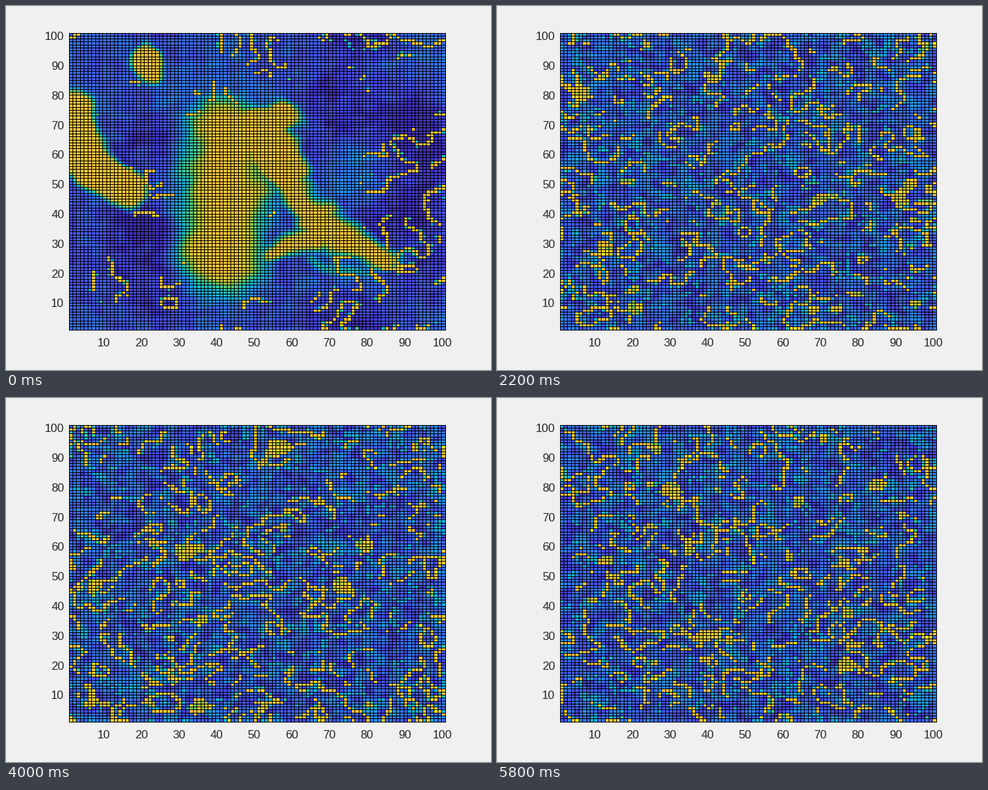
Write a matplotlib script that moves like this. It is 700x525 px and loops after 6000 ms.

```python
import numpy as np
import matplotlib.pyplot as plt
from matplotlib.animation import FuncAnimation

W, H, DPI = 700, 525, 100
N, FRAMES, STEP = 100, 30, 200
LEFT, TOP, PW, PH = 91, 39, 544, 429

PARULA = np.array([
    (.2422, .1504, .6603), (.2810, .3228, .9579), (.1786, .5289, .9682),
    (.0689, .6948, .8394), (.2161, .7843, .5923), (.6720, .7793, .2227),
    (.9970, .7659, .2199), (.9769, .9839, .0805)])

# Hot strokes of the opening state: x0, y0, x1, y1, radius, fade width
STROKES = [
    (43, 68, 41, 24, 4, 13), (50, 69, 56, 73, 4, 4), (53, 66, 57, 54, 4, 4),
    (57, 50, 66, 40, 2, 5), (66, 36, 82, 25, 2, 6), (55, 27, 66, 30, 1, 5),
    (66, 24, 80, 17, -3, 6), (3, 75, 4, 58, 4, 4), (5, 56, 17, 46, 3, 4),
    (22, 88, 22, 93, 2, 3)]


def noise(rng, s):
    """Periodic smooth noise with unit deviation."""
    f = np.fft.fftfreq(N)
    k = np.exp(-2 * (np.pi * s) ** 2 * (f[:, None] ** 2 + f ** 2))
    a = np.fft.ifft2(np.fft.fft2(rng.standard_normal((N, N))) * k).real
    return (a - a.mean()) / a.std()


def filaments(rng, s):
    """Distance in cells to the zero contours of a noise field."""
    n = noise(rng, s)
    gy, gx = np.gradient(n)
    return np.abs(n) / (np.hypot(gx, gy) + .02)


def hot(rng):
    v = .85 + .03 * rng.standard_normal((N, N))
    return np.where(rng.random((N, N)) < .08, .96, v)


def stroke(x, y, x0, y0, x1, y1, r, fade):
    """Smooth 0..1 level around a segment."""
    dx, dy = x1 - x0, y1 - y0
    t = np.clip(((x - x0) * dx + (y - y0) * dy) / (dx * dx + dy * dy), 0, 1)
    d = np.hypot(x - x0 - t * dx, y - y0 - t * dy)
    u = np.clip(1 - (d - r) / fade, 0, 1)
    return u * u * (3 - 2 * u)


def weave(rng, v, d, live, fringe):
    """Lay hot lines with a ragged green fringe over v."""
    r = rng.random((N, N))
    v = np.where(live & (d < 1.2) & (r < fringe), .36 + .9 * r, v)
    return np.where(live & (d < .55), hot(rng), v)


def opening(rng):
    y, x = np.mgrid[1:N + 1, 1:N + 1].astype(float)
    wx, wy = x + noise(rng, 2.5), y + noise(rng, 2.5)
    heat = np.max([stroke(wx, wy, *s) for s in STROKES], axis=0)
    pool = np.exp(-((x - 72) / 11) ** 2 - ((y - 60) / 17) ** 2)
    base = .15 + .06 * noise(rng, 7) + .03 * noise(rng, 1) - .1 * pool
    base = np.clip(base, .03, .33)
    v = base + (.86 - base) * heat
    ragged = noise(rng, 4) + (x - 50) / 60 - pool > .55
    return weave(rng, v, filaments(rng, 1.9), ragged & (heat < .6), .25)


def turbulence(rng, s):
    v = np.clip(.2 + .07 * noise(rng, .7), .08, .36)
    r = rng.random((N, N))
    v = np.where((noise(rng, 1) > 1) & (r < .6), .36 + .16 * r, v)
    v = weave(rng, v, filaments(rng, s), noise(rng, 1.8) > -.25, .25)
    blob = noise(rng, 1.8) > 2
    return np.where(blob, np.where(r < .7, hot(rng), .35 + .4 * r), v)


def cells(i):
    rng = np.random.default_rng(40 + i)
    return turbulence(rng, 1.5 + 2 * np.exp(-i)) if i else opening(rng)


def grid(size):
    """Line pixels and the cell under each pixel along one axis."""
    lines = np.floor(np.linspace(0, size - 1, N + 1)).astype(int)
    under = np.searchsorted(lines, np.arange(size), 'right') - 1
    return lines, np.minimum(under, N - 1)


ex, ix = grid(PW)
ey, iy = grid(PH)
stops = np.linspace(0, 1, len(PARULA))


def picture(i):
    v = cells(i)[::-1]
    rgb = np.stack([np.interp(v, stops, c) for c in PARULA.T], axis=-1)
    img = np.rint(rgb * 255).astype(np.uint8)[iy][:, ix]
    img[ey] = 0
    img[:, ex] = 0
    return img


fig = plt.figure(figsize=(W / DPI, H / DPI), dpi=DPI, facecolor='#f0f0f0')
mesh = fig.figimage(picture(0), xo=LEFT, yo=H - TOP - PH, origin='upper')


def label(x, y, s, ha):
    fig.text(x / W, 1 - y / H, s, ha=ha, va='baseline', fontsize=12.2,
             family='Liberation Sans', color='#262626')


for n in range(10, N + 1, 10):
    label(LEFT + 1 + (n - 1) * (PW - 1) / N, 491, str(n), 'center')
    label(84, TOP + PH + 5 - (n - 1) * (PH - 1) / N, str(n), 'right')


def update(i):
    mesh.set_data(picture(i))
    return [mesh]


anim = FuncAnimation(fig, update, frames=FRAMES, interval=STEP,
                     repeat=True, repeat_delay=0, blit=False)
plt.show()
```
